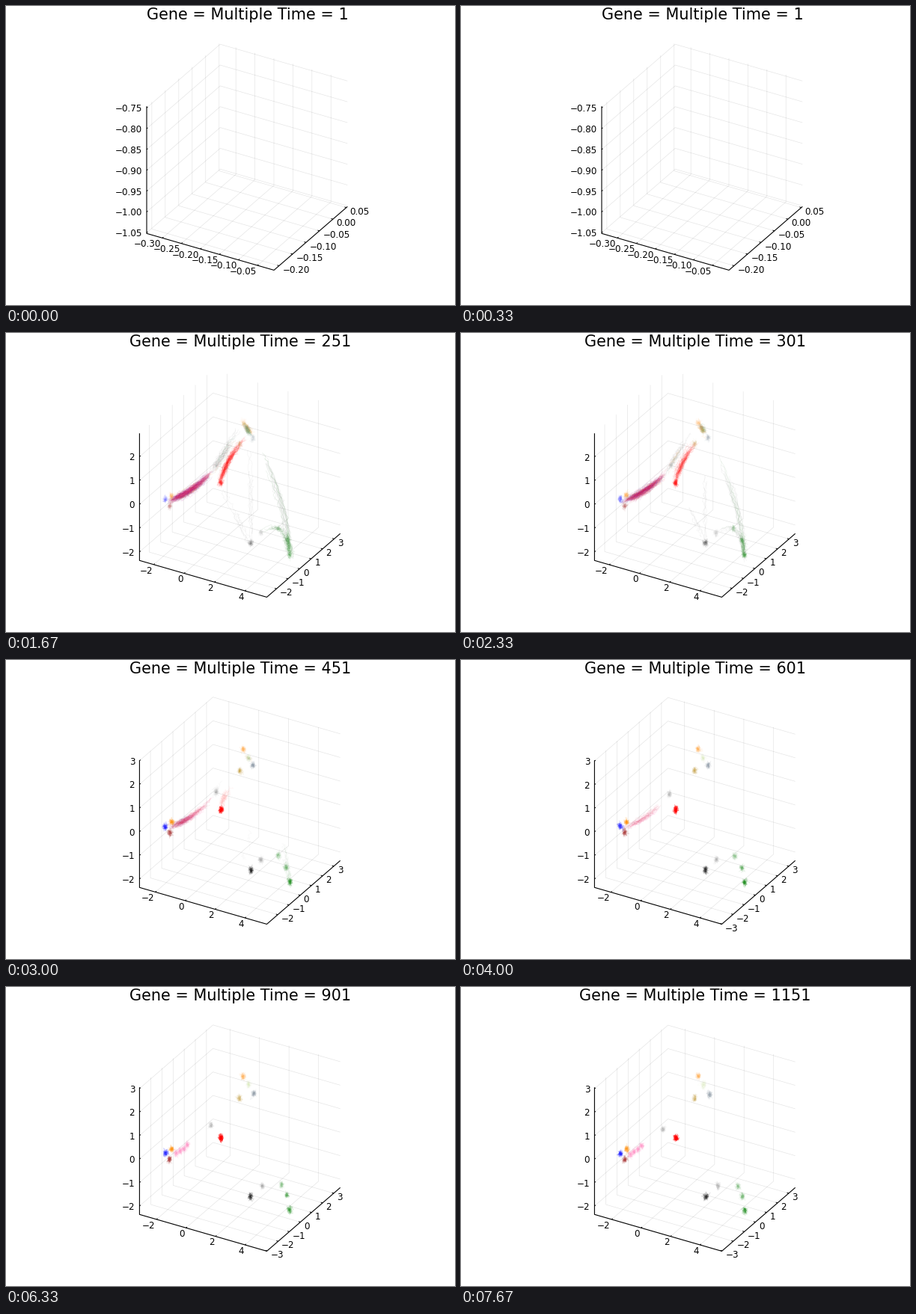
These frames come from a looping animation (600x400 px, 8000 ms). A matplotlib script:

```python
import matplotlib.pyplot as plt
import numpy as np
from matplotlib.animation import FuncAnimation
from matplotlib.collections import LineCollection

FRAMES, LOOP_MS = 24, 8000
DPI = 100
PX = 72 / DPI  # points per pixel
plt.rcParams["font.family"] = "DejaVu Sans"

fig = plt.figure(figsize=(6, 4), dpi=DPI, facecolor="white")
ax = fig.add_axes([0, 0, 1, 1])

# Screen vectors of the box edges: orthographic camera at 30/30 degrees
SCALE, TILT = 196.4, np.radians(30)
EDGES = SCALE * np.array([[np.cos(TILT), np.sin(TILT) ** 2],
                          [np.sin(TILT), -np.cos(TILT) * np.sin(TILT)],
                          [0, -np.cos(TILT)]])

# Landmarks on the stage, in pixels
CORE, APEX, WAIST, FORK = map(np.array, [(274, 237), (316, 118), (326, 134), (276, 184)])
LEFT, RED, DARK, GREEN = map(np.array, [(220, 224), (286, 200), (327, 281), (379, 297)])


def curve(start, end, bend=0.0):
    """Quadratic curve whose control point sits off the middle of the chord."""
    dx, dy = end - start
    control = (start + end) / 2 + bend * np.array([-dy, dx])

    def at(t):
        t = np.asarray(t, float)[..., None]
        return (1 - t) ** 2 * start + 2 * t * (1 - t) * control + t ** 2 * end
    return at


tip = curve(APEX, WAIST)
rise = curve(APEX, FORK)
arc = curve(FORK, LEFT, -0.12)
red_path = curve(WAIST, RED, 0.14)
fall = curve(WAIST, GREEN, -0.12)
arch = curve(DARK, GREEN, -1.1)

# path, colours, number of trails, step at which they have half settled
STREAMS = [
    (rise, ["darkorange", "indianred", "gray", "seagreen"], 45, 4),
    (rise, ["gray"], 10, 6),
    (arc, ["mediumvioletred", "purple", "mediumvioletred", "slateblue", "darkorange"], 170, 7),
    (arc, ["crimson", "hotpink"], 45, 12),
    (red_path, ["red"], 85, 6),
    (tip, ["darkorange", "gray", "seagreen"], 45, 6),
    (fall, ["dimgray", "darkgreen"], 20, 6),
    (curve(WAIST, DARK), ["gray"], 6, 6),
    (curve(RED, DARK), ["gray"], 6, 6),
    (arch, ["gray", "darkgreen"], 14, 6),
    (curve(fall(0.8), GREEN), ["forestgreen"], 30, 6),
]

# colour, place when settled, place at the end, weight
CLUMPS = [
    ("red", RED + (1, 0), RED + (1, 2), 0.32),
    ("black", DARK, DARK, 0.13),
    ("gray", arch(0.17), arch(0.2), 0.06),
    ("green", arch(0.55), arch(0.68), 0.045),
    ("green", arch(0.82), arch(0.85), 0.06),
    ("green", GREEN, GREEN + (0, 2), 0.13),
    ("gray", rise(0.88), arc(0.12), 0.05),
    ("darkorange", tip(0.1), tip(0.1), 0.07),
    ("yellowgreen", tip(0.8), tip(0.8), 0.025),
    ("slategray", tip(1.4), tip(1.6), 0.09),
    ("darkgoldenrod", red_path(0.25), red_path(0.26), 0.07),
]
for i, color in enumerate(["brown", "blue", "darkorange"]):
    angle = np.radians(100 + 90 * i)
    place = LEFT + 7 * np.array([np.cos(angle), np.sin(angle)])
    CLUMPS.append((color, place, place, 0.14))

LATE_STEP = 12
LATE_CLUMPS = [("hotpink", arc(t), arc(t + 0.06) + (0, 18 * t - 12), 0.07)
               for t in np.linspace(0.6, 0.85, 4)]


def approach(step, final, gap, tau):
    return final - gap * np.exp(-(step - 3) / tau)


def limits_at(step):
    if step == 0:
        return [(-0.3413, -0.0066), (-0.219, 0.054), (-1.0518, -0.7464)]
    return [(approach(step, -3.17, -0.35, 5), approach(step, 5.48, 0.07, 5)),
            (approach(step, -3.03, -0.37, 3), approach(step, 3.59, 0.12, 3)),
            (-2.36, approach(step, 3.07, 0.115, 8))]


def ticks(low, high, size):
    return size * np.arange(np.ceil(low / size), np.floor(high / size) + 1)


def tick_text(value, size):
    text = f"{value:.2f}" if size < 1 else f"{value:.0f}"
    if float(text) == 0:
        text = text.lstrip("-")
    return text.replace("-", "\u2212")


def segments(lines, colors, width, alpha=1.0):
    ax.add_collection(LineCollection(lines, colors=colors, linewidths=width * PX,
                                     alpha=alpha))


def draw_axes(step):
    origin = np.array([188.0 if step == 0 else 178.4, 304.3])

    def point(u, v, w):
        return origin + np.array([u, v, w]) @ EDGES

    grid, marks = [], []
    sizes = [0.05] * 3 if step == 0 else [2, 1, 1]
    for axis, ((low, high), size) in enumerate(zip(limits_at(step), sizes)):
        for value in ticks(low, high, size):
            t = (value - low) / (high - low)
            if axis == 0:
                front, back, top = point(t, 0, 0), point(t, 1, 0), point(t, 1, 1)
                label, align = front + (-1.5, 11.8), "right"
            elif axis == 1:
                front, back, top = point(1, t, 0), point(0, t, 0), point(0, t, 1)
                label, align = front + (4.5, 9.3), "left"
            else:
                front, back, top = point(0, 0, t), point(0, 1, t), point(1, 1, t)
                label, align = front + (-6.2, 5.0), "right"
            grid.append([front, back, top])
            marks.append([front, front + 0.014 * (back - front)])
            ax.text(*label, tick_text(value, size), ha=align, va="baseline",
                    fontsize=11.9 * PX)
    segments(grid, "black", 0.7, 0.1)
    segments(marks, "black", 1)
    segments([[point(0, 0, 1), point(0, 0, 0), point(1, 0, 0), point(1, 1, 0)]], "black", 1.1)
    ax.text(origin[0] + 134.8, 18, f"Gene = Multiple Time = {1 + 50 * step}",
            ha="center", va="baseline", fontsize=20.72 * PX)


def trail(rng, path, reach):
    first = 1 - reach * rng.uniform(0.5, 1)
    last = rng.uniform(0.8, 1.05)
    line = path(np.linspace(first, last, 24))
    return line + rng.normal(0, 1.8, 2) + rng.normal(0, 1.1, line.shape)


def draw_streams(step, rng):
    growth = min(1, step / 3)
    for path, colors, count, settle in STREAMS:
        fade = 1 / (1 + np.exp(step - settle))
        if fade < 0.03:
            continue
        lines = [trail(rng, path, fade ** 0.3) for _ in range(round(count * fade ** 0.5))]
        segments(lines, rng.choice(colors, len(lines)), 0.8, 0.08 * growth * fade ** 0.25)
    if step < 3:
        for end in (APEX, FORK):
            lines = [trail(rng, curve(CORE, end), 1) for _ in range(20)]
            segments(lines, "gray", 0.8, 0.08 / step)


def draw_clumps(step, rng, clumps, first):
    strength = np.clip((step - first) / 6, 0, 1)
    if strength == 0:
        return
    drift = np.clip((step - 9) / 14, 0, 1)
    for color, start, end, weight in clumps:
        centre = start + (end - start) * drift
        offsets = rng.normal(0, 0.6, (20, 1, 2)) + rng.normal(0, 0.8, (20, 10, 2))
        segments(list(centre + offsets * (1.7, 2.3)), color, 0.8, weight * strength)


def draw(step):
    ax.clear()
    ax.set_xlim(0, 600)
    ax.set_ylim(400, 0)
    ax.axis("off")
    draw_axes(step)
    if step > 0:
        rng = np.random.default_rng(100 + step)
        draw_streams(step, rng)
        draw_clumps(step, rng, CLUMPS, 3)
        draw_clumps(step, rng, LATE_CLUMPS, LATE_STEP)
    return []


anim = FuncAnimation(fig, draw, frames=FRAMES, interval=LOOP_MS / FRAMES,
                     init_func=lambda: [], repeat=True, repeat_delay=0)
plt.show()
```
